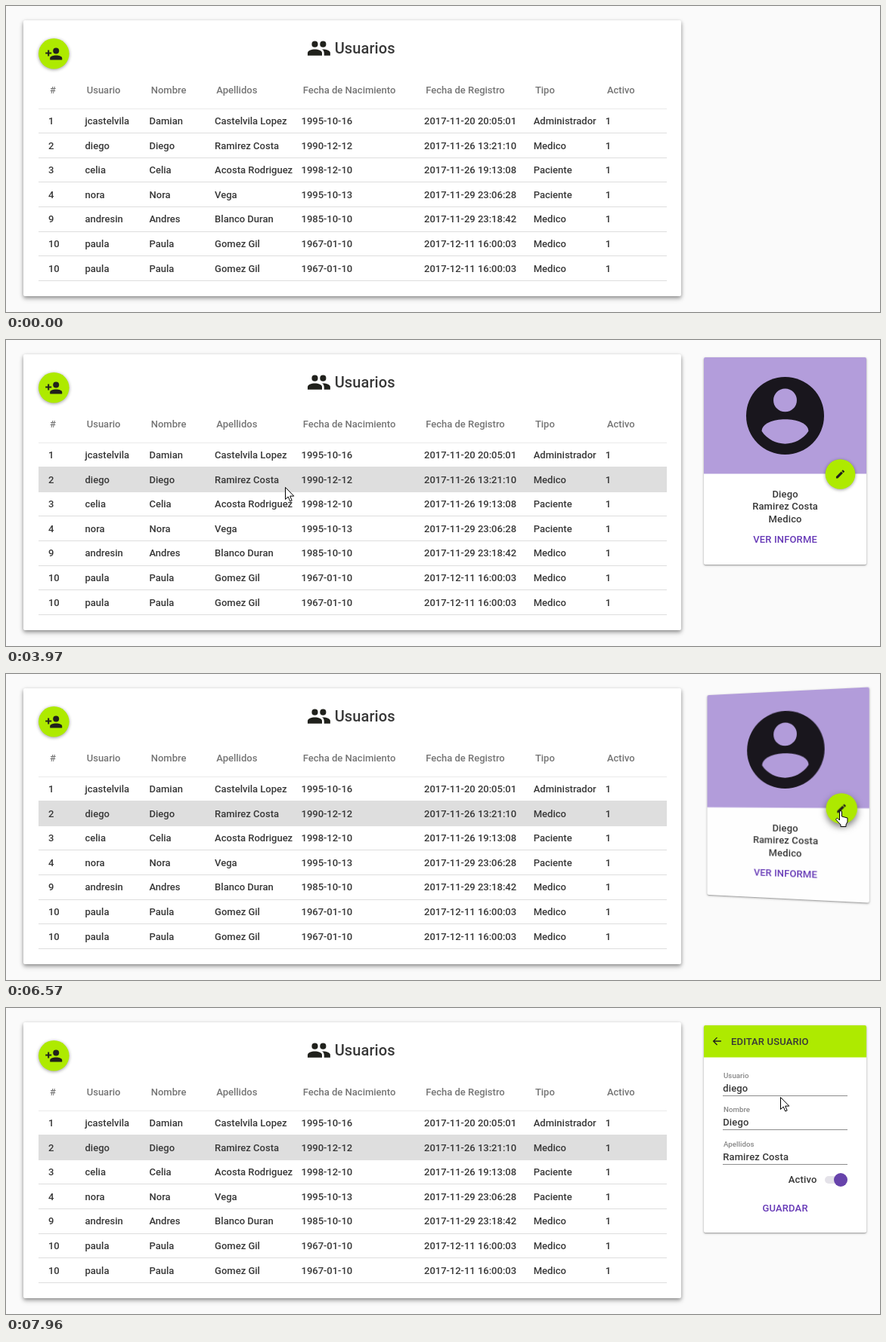
An HTML page that plays this animation: 1156x406 px, repeating every 7.99 s.

```html
<!DOCTYPE html>
<html lang="es">
<head>
<meta charset="utf-8">
<title>Usuarios</title>
<style>
  html, body { margin: 0; width: 100%; height: 100%; overflow: hidden; background: #fafafa; }
  body { position: relative; }
  svg { position: absolute; left: 0; top: 0; display: block; }
  text { font: 500 13px Roboto, sans-serif; fill: #383838; }
  .panel { position: absolute; left: 23px; top: 19px; width: 870px; height: 365.5px; border-radius: 2px; background: #fff;
    box-shadow: 0 2px 5px rgba(0,0,0,.36), 0 4px 7px rgba(0,0,0,.14); }
  .scene { position: absolute; left: 923px; top: 23px; width: 215px; height: 275px; perspective: 278px; }
  .face { position: absolute; inset: 0; border-radius: 2px; background: #fff;
    box-shadow: 0 1px 3px rgba(0,0,0,.35), 0 1px 1px rgba(0,0,0,.14); }
  .face svg { border-radius: 2px; }
  .face text { letter-spacing: .15px; }
  .icon { fill: #20211c; }
  .line { fill: none; stroke: #20211c; stroke-width: 2; }
  .fab { fill: #aeea00; filter: drop-shadow(0 1px 2px rgba(0,0,0,.4)); }
  .fab.hover { filter: drop-shadow(0 4px 4px rgba(0,0,0,.5)); }
  text.head { fill: #757575; }
  text.title { font-size: 20px; letter-spacing: .1px; }
  text.label { font-size: 9.75px; fill: #888; letter-spacing: 0; }
  text.action { fill: #673ab7; }
  .mid { text-anchor: middle; }
  .pointer path { fill: #fff; stroke: #000; stroke-linejoin: round; }
</style>
</head>
<body>
<div class="panel"></div>
<svg id="table" width="1156" height="406"></svg>
<div class="scene" id="scene">
  <div class="face" id="front"><svg width="215" height="275" viewBox="923 23 215 275"></svg></div>
  <div class="face" id="back"><svg width="215" height="275" viewBox="923 23 215 275"></svg></div>
</div>
<svg class="pointer" width="1156" height="406">
  <path id="arrow" d="M.5 .5V16.5L4.2 13 6.8 19 9.2 18 6.7 12.1H11.8Z"/>
  <path id="hand" d="M-1.5 13V2a1.5 1.5 0 0 1 3 0v6l7.5 2v5l-2 4v2.5H0V19L-6 12.5a1.5 1.5 0 0 1 2.3-1.8Z"/>
</svg>
<script>
const LOOP = 7990, ROW = 32.6, TOP = 136, LEFT = 43, RIGHT = 874;
const LIME = '#aeea00', LILAC = '#b39ddb';
const $ = id => document.getElementById(id);
const text = (x, y, str, cls = '') => `<text x="${x}" y="${y}" class="${cls}">${str}</text>`;
const rect = (x, y, w, h, fill, extra = '') => `<rect x="${x}" y="${y}" width="${w}" height="${h}" fill="${fill}" ${extra}/>`;
const circle = (x, y, r, extra = '') => `<circle cx="${x}" cy="${y}" r="${r}" ${extra}/>`;
const shape = (d, extra = '') => `<path d="${d}" ${extra}/>`;

// Icons are drawn on a 24 unit grid
const icon = (x, y, scale, body) => `<g class="icon" transform="translate(${x} ${y}) scale(${scale})">${body}</g>`;
const person = (x, head, half, extra) =>
  shape(`M${x - half} ${12 + half}v-2.3c0-4.9 ${2 * half}-4.9 ${2 * half} 0v2.3z`, extra) + circle(x, 8, head);
const groupIcon = person(16, 3, 7) + person(8, 3, 7, 'stroke="#fff" stroke-width="4" paint-order="stroke"');
const addUserIcon = person(15, 4, 8) + shape('M1 11h8M5 7v8', 'class="line"');
const accountIcon = circle(12, 12, 10, 'fill="#19161d"') +
  `<g fill="${LILAC}">${circle(12, 8, 3)}${shape('M6 16c0-4.1 12-4.1 12 0-2.9 4.3-9.1 4.3-12 0z')}</g>`;
const editIcon = shape('M3 17.2V21h3.8L17.8 10 14 6.2zM15.2 5.1l2.5-2.5 3.8 3.8-2.5 2.5z');
const backIcon = shape('M20 12H5M12 4.7L4.7 12l7.3 7.3', 'class="line"');

// Table
const columns = [55.9, 104.5, 189.5, 276.1, 390.5, 553, 697.7, 792.7];
const heads = ['#', 'Usuario', 'Nombre', 'Apellidos', 'Fecha de Nacimiento', 'Fecha de Registro', 'Tipo', 'Activo'];
const paula = '10|paula|Paula|Gomez Gil|1967-01-10|2017-12-11 16:00:03|Medico|1';
const rows = [
  '1|jcastelvila|Damian|Castelvila Lopez|1995-10-16|2017-11-20 20:05:01|Administrador|1',
  '2|diego|Diego|Ramirez Costa|1990-12-12|2017-11-26 13:21:10|Medico|1',
  '3|celia|Celia|Acosta Rodriguez|1998-12-10|2017-11-26 19:13:08|Paciente|1',
  '4|nora|Nora|Vega|1995-10-13|2017-11-29 23:06:28|Paciente|1',
  '9|andresin|Andres|Blanco Duran|1985-10-10|2017-11-29 23:18:42|Medico|1',
  paula, paula
].map(row => row.split('|'));

const drawRow = (cells, i) => {
  const y = Math.floor(TOP + ROW * i), bottom = Math.floor(TOP + ROW * (i + 1));
  return rect(LEFT, y, RIGHT - LEFT, bottom - y, '#dedede', `id="row${i}"`) +
    rect(LEFT, bottom, RIGHT - LEFT, 1, '#dedede') +
    cells.map((cell, c) => text(columns[c], Math.round(157 + ROW * i), cell)).join('');
};

$('table').innerHTML =
  rect(LEFT, TOP, RIGHT - LEFT, 1, '#eaeaea') + rows.map(drawRow).join('') +
  heads.map((h, i) => text(columns[i] + 2.2, 116, h, 'head')).join('') +
  icon(397.6, 39.8, 1.36, groupIcon) + text(434.7, 63, 'Usuarios', 'title') +
  circle(63.3, 63.3, 20.3, 'class="fab"') + icon(51.2, 51.5, 1, addUserIcon);

// Card faces
const [, login, first, last, , , role] = rows[1];
$('front').firstChild.innerHTML =
  rect(923, 23, 215, 154.5, LILAC) + icon(968.7, 38.7, 5.15, accountIcon) +
  circle(1103.5, 178, 19.8, 'class="fab" id="editButton"') + icon(1096.1, 170.7, .61, editIcon) +
  [first, last, role].map((s, i) => text(1030.6, Math.round(209 + 16.4 * i), s, 'mid')).join('') +
  text(1030.6, 269, 'VER INFORME', 'mid action');

$('back').firstChild.innerHTML =
  rect(923, 23, 215, 42.5, LIME) + icon(932.5, 36, .67, backIcon) + text(959, 49, 'EDITAR USUARIO') +
  [['Usuario', login], ['Nombre', first], ['Apellidos', last]].map(([label, value], i) => {
    const y = Math.floor(116 + 45.5 * i);
    return text(949, y - 23.5, label, 'label') + text(948.2, y - 5, value) + rect(948, y, 165, 1, '#8c8c8c');
  }).join('') +
  text(1034.7, 232, 'Activo') + rect(1083, 223, 28, 10, '#e4e2e9', 'rx="5"') +
  circle(1104, 228, 9, 'fill="#6743ab"') + text(1030.6, 270, 'GUARDAR', 'mid action');

// Pointer stops: [time, x, y]
const path = [
  [520, 20, 175], [1000, 200, 121], [1300, 284, 127], [1460, 285, 135], [1900, 287, 149], [2660, 287, 149],
  [2700, 286, 169], [2850, 283, 171], [3040, 269, 179], [3850, 269, 179], [4250, 600, 233], [4610, 909, 195],
  [4710, 909, 195], [4810, 952.5, 144], [5000, 1010, 121], [5480, 1119, 160], [5720, 1110, 224],
  [5950, 1104, 181], [6590, 1104, 181], [6690, 1102.5, 176.5], [6990, 1100, 141], [7560, 1100, 141], [7960, 1024, 118]
];
const CLICK = 3340, FLIP = 6483, FADE_STEPS = 10;

const clamp = v => Math.min(1, Math.max(0, v));
const easeInOut = p => p < .5 ? 4 * p ** 3 : 1 - 4 * (1 - p) ** 3;

function pointerAt(t) {
  const next = path.findIndex(stop => stop[0] > t);
  if (next < 1) return path[next ? path.length - 1 : 0].slice(1);
  const [t0, x0, y0] = path[next - 1], [t1, x1, y1] = path[next];
  const p = (t - t0) / (t1 - t0);
  return [x0 + (x1 - x0) * p, y0 + (y1 - y0) * p];
}

function hoveredRow(t) {
  const [x, y] = pointerAt(t);
  return x > LEFT && x < RIGHT ? Math.floor((y - TOP) / ROW) : -1;
}

// A highlight fades with the share of the last 100 ms spent over the row
function highlight(row, t) {
  if (row === 1 && t > CLICK) return 1;
  let hits = 0;
  for (let k = 0; k < FADE_STEPS; k++) hits += hoveredRow(t - k * 10) === row;
  return hits / FADE_STEPS;
}

function showFace(face, visible, degrees) {
  face.style.visibility = visible ? 'visible' : 'hidden';
  face.style.transform = degrees ? `rotateY(${degrees}deg)` : 'none';
  face.style.filter = degrees ? `brightness(${Math.cos(degrees * Math.PI / 180)})` : 'none';
}

function draw(t) {
  rows.forEach((_, i) => $('row' + i).setAttribute('opacity', highlight(i, t)));

  $('scene').style.opacity = clamp((t - CLICK) / 140);
  const angle = 180 * easeInOut(clamp((t - FLIP) / 440));
  showFace($('front'), angle < 90, -angle);
  showFace($('back'), angle >= 90, 180 - angle);

  const [x, y] = pointerAt(t);
  const onButton = t < 6650 && Math.hypot(x - 1103.5, y - 178) < 20;
  $('editButton').classList.toggle('hover', onButton);
  for (const [id, shown] of [['arrow', !onButton], ['hand', onButton]]) {
    $(id).setAttribute('transform', `translate(${Math.round(x)} ${Math.round(y)})`);
    $(id).style.display = shown && t >= path[0][0] ? '' : 'none';
  }
}

const start = performance.now();
function tick() {
  draw((performance.now() - start) % LOOP);
  requestAnimationFrame(tick);
}
tick();
</script>
</body>
</html>
```
